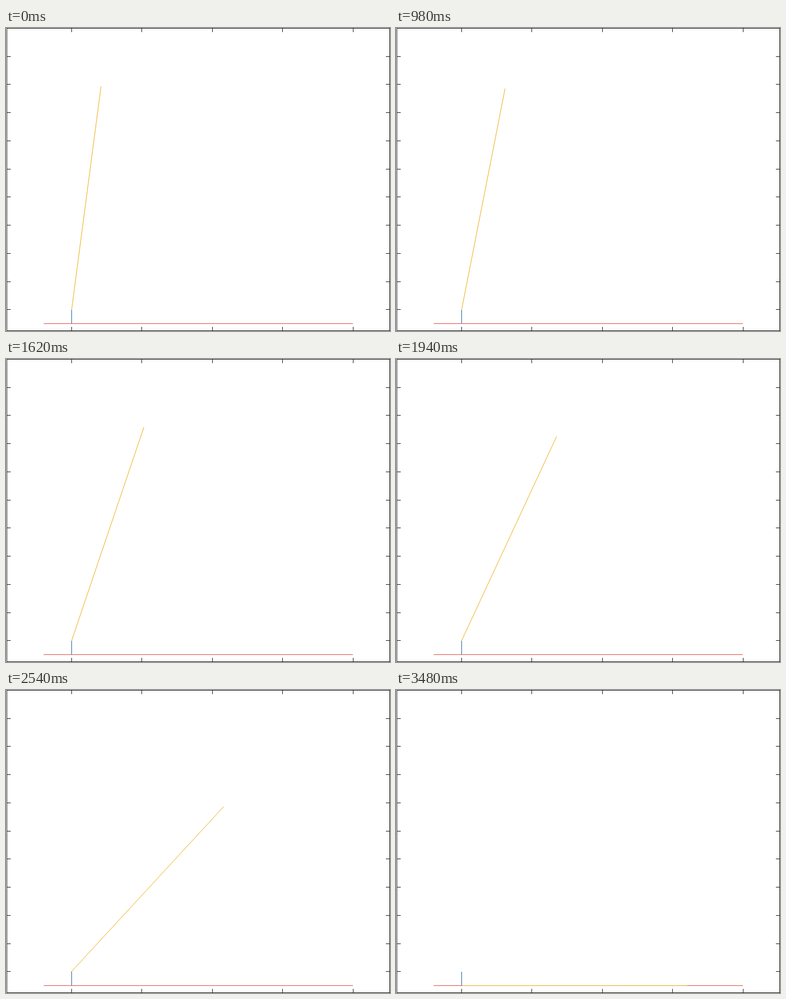
An HTML page for the animation above (3500 ms loop, 652 by 514 pixels).

```html
<!DOCTYPE html>
<html lang="en">
<head>
<meta charset="utf-8">
<title>Falling rod</title>
<style>
  html, body { margin: 0; width: 100%; height: 100%; overflow: hidden; background: #fff; }
  svg { display: block; }
  .axes { fill: none; stroke: #262626; shape-rendering: crispEdges; }
</style>
</head>
<body>
<svg width="652" height="514" viewBox="0 0 652 514">
  <rect class="axes" x="1.5" y=".5" width="650" height="513"/>
  <path class="axes" id="ticks"/>
  <path d="M111.5 478V501.5" stroke="#2b6ca3"/>
  <path d="M64 501.5H589" stroke="#dd5a50"/>
  <line id="rod" stroke="#edb120"/>
</svg>
<script>
const LOOP = 3500, STEP = 20, LENGTH = 382;
const PULL = 0.9375;          // 3g / 2L
const SLIP = 2.16, FREE = 2.54, DROP = 2.43, LAND = 2.943;
const rod = document.getElementById('rod');

let d = '';
for (let i = 0; i < 5; i++) {
  const x = Math.round(111 + 119.4 * i) + 0.5;
  d += `M${x} 0v7M${x} 514v-7`;
}
for (let i = 0; i < 10; i++) {
  const y = Math.round(477.3 - 47.73 * i) + 0.5;
  d += `M1 ${y}h7M652 ${y}h-7`;
}
document.getElementById('ticks').setAttribute('d', d);

const clamp01 = v => Math.min(1, Math.max(0, v));
const smooth = v => { v = clamp01(v); return v * v * (3 - 2 * v); };

// Angle of a rod toppling about a fixed foot
function topple(angle, speed, time) {
  const n = Math.ceil(time * 1000), h = time / (n || 1);
  for (let i = 0; i < n; i++) {
    const a = PULL * Math.sin(angle);
    angle += speed * h + a * h * h / 2;
    speed += (a + PULL * Math.sin(angle)) / 2 * h;
  }
  return angle;
}

function hermite(p, v, q, w, span, u) {
  const a = u * u * (3 - 2 * u), b = u * (1 - u);
  return p * (1 - a) + q * a + span * b * (v * (1 - u) - w * u);
}

function angleAt(t) {
  if (t <= SLIP) return topple(0.1309, 0, t);
  if (t <= FREE) return hermite(0.533, 0.4935, 0.7455, 0.665, FREE - SLIP, (t - SLIP) / (FREE - SLIP));
  if (t <= LAND) return 0.7455 + 0.665 * (t - FREE);
  return Math.min(Math.PI / 2, topple(1.0135, 0.807, t - LAND));
}

function footAt(t) {
  const fall = Math.max(0, t - DROP);
  return [
    111.5 - 1.2 * smooth((t - SLIP) / 0.36) + 2.2 * smooth((t - 2.7) / 0.24),
    Math.min(501.5, 477.6 + 90.7 * fall * fall)
  ];
}

const poses = Array.from({ length: LOOP / STEP }, (_, i) => {
  const t = i * STEP / 1000, a = angleAt(t), [x, y] = footAt(t);
  return { x1: x, y1: y, x2: x + LENGTH * Math.sin(a), y2: y - LENGTH * Math.cos(a) };
});

function draw() {
  const pose = poses[Math.floor(performance.now() % LOOP / STEP)];
  for (const key in pose) rod.setAttribute(key, pose[key].toFixed(2));
  requestAnimationFrame(draw);
}
draw();
</script>
</body>
</html>
```
